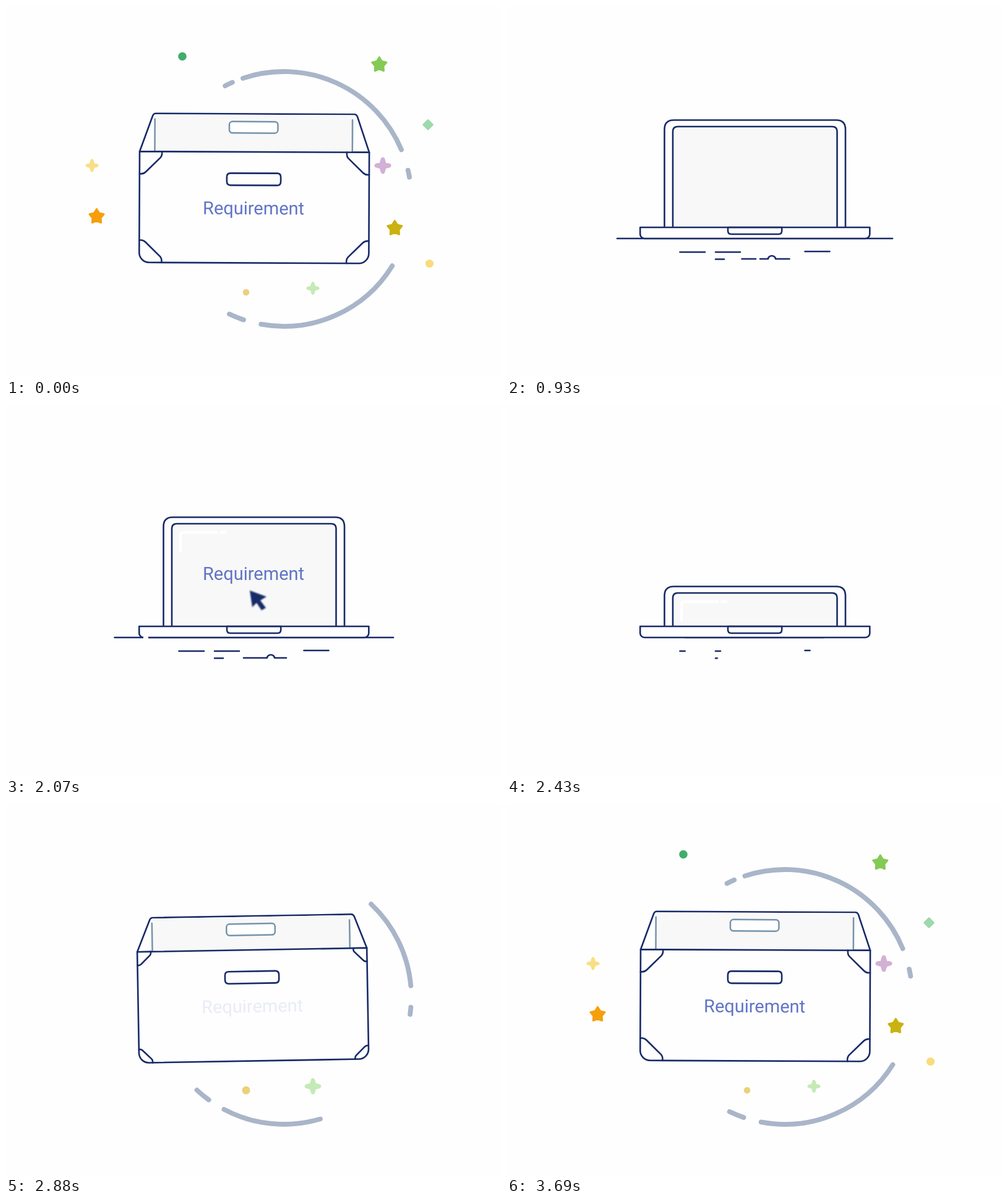
Animation of 800 by 600 pixels, one loop 3.72 s. Source, as an HTML page:

```html
<!DOCTYPE html>
<html lang="en">
<head>
<meta charset="utf-8">
<title>Requirement box</title>
<style>
  html, body { margin: 0; width: 100%; height: 100%; overflow: hidden; background: #fefefe; }
  svg { display: block; width: 800px; height: 600px; }
  .ink { fill: none; stroke: #182a68; stroke-width: 2.6; stroke-linecap: round; stroke-linejoin: round; }
  .white { fill: #fefefe; }
  .steel { fill: none; stroke: #7594ab; stroke-width: 2.5; stroke-linecap: round; }
  .ring { fill: none; stroke: #a9b5c8; stroke-width: 7.8; stroke-linecap: round; }
  .shine { fill: none; stroke: #fff; stroke-width: 4.5; stroke-linecap: round; }
  .grey { fill: #f8f8f8; }
  text { font: 29px Roboto, sans-serif; fill: #6074c5; }
</style>
</head>
<body>
<svg viewBox="0 0 800 600">
  <defs>
    <clipPath id="screen"><rect x="268" y="170" width="265" height="187"/></clipPath>
    <filter id="blur" x="-30%" y="-30%" width="160%" height="160%"><feGaussianBlur stdDeviation="1.3 .8"/></filter>
  </defs>

  <path id="ground" class="ink"/>
  <path id="dashes" class="ink"/>

  <g id="lid">
    <path id="shell" class="ink white"/>
    <path id="panel" class="ink" style="fill:#f8f8f8"/>
    <g clip-path="url(#screen)">
      <g id="content">
        <path id="shine" class="shine" pathLength="1" d="M282 236V211Q282 206 287 206H340"/>
        <path id="glint" class="shine" d="M347 206h7"/>
        <text id="typed" x="318" y="282.5"></text>
        <path id="cursor" fill="#182a68" filter="url(#blur)" d="M0 0L27 10 17 16 26 28 19 32 11 20 4 27Z"/>
      </g>
    </g>
  </g>

  <path id="drop" class="ink white"/>
  <path id="ringLow" class="ring"/>
  <path id="ringTop" class="ring"/>
  <g id="box">
    <g id="back">
      <path id="backEdge" class="ink white"/>
      <path id="backFill" class="grey"/>
      <path id="backLines" class="steel"/>
      <rect id="backGrip" class="steel" style="fill:#fff" x="360" width="78.5" height="18.5" rx="5"/>
    </g>
    <path id="front" class="ink white"/>
    <path id="corners" class="ink"/>
    <path id="grip" class="ink"/>
    <text id="label" x="317.7" y="337">Requirement</text>
  </g>
  <rect id="gap" class="white" y="374" width="8" height="4"/>
  <g id="confetti"></g>
</svg>
<script>
const LOOP = 3720, WORD = 'Requirement';
const el = {};
document.querySelectorAll('[id]').forEach(n => el[n.id] = n);

const set = (id, attrs) => { for (const k in attrs) el[id].setAttribute(k, attrs[k]); };
const show = (id, amount) => set(id, { opacity: +amount });
const mix = (a, b, p) => a + (b - a) * p;
const smooth = x => x * x * (3 - 2 * x);

// Eased value through [time, value] keys
function track(t, ...keys) {
  if (t <= keys[0][0]) return keys[0][1];
  for (let i = 1; i < keys.length; i++) {
    const [t0, a] = keys[i - 1], [t1, b] = keys[i];
    if (t < t1) return mix(a, b, smooth((t - t0) / (t1 - t0)));
  }
  return keys[keys.length - 1][1];
}
const ramp = (t, a, b) => track(t, [a, 0], [b, 1]);

// Confetti: shape, x, y, size, colour, start time
const bits = [
  ['star', 603.3, 95, 12, '#84ca54', 2910],
  ['star', 628.3, 359.5, 12, '#cab210', 2880],
  ['star', 146.5, 340.5, 12, '#f69f0b', 3035],
  ['dot', 285, 81.5, 6.8, '#42ac6d', 3150],
  ['dot', 684.5, 416.5, 6.6, '#f8dc7c', 2880],
  ['dot', 388, 463, 5.3, '#ecd17a', 2690],
  ['diamond', 682, 192, 7.5, '#9dd9ac', 3210],
  ['cross', 139, 258, 10.5, '#f8df86', 3180],
  ['cross', 609, 258, 13.5, '#d3b0d6', 3120],
  ['cross', 496, 456.5, 10.5, '#c5eab6', 2700]
];
const shapes = {
  star(r) {
    const pts = [...Array(10).keys()].map(i => {
      const a = i * Math.PI / 5 - Math.PI / 2, d = i % 2 ? r * .57 : r;
      return (d * Math.cos(a)).toFixed(2) + ' ' + (d * Math.sin(a)).toFixed(2);
    });
    return ['M' + pts.join('L') + 'Z', 3.2];
  },
  dot: r => [`M${-r / 2} 0a${r / 2} ${r / 2} 0 1 0 ${r} 0a${r / 2} ${r / 2} 0 1 0 ${-r} 0Z`, r],
  diamond: r => [`M0 ${-r}L${r} 0 0 ${r} ${-r} 0Z`, 2.5],
  cross(r) {
    const a = r * .75, b = r * .17;
    return [`M0 ${-a}L${b} ${-b} ${a} 0 ${b} ${b} 0 ${a} ${-b} ${b} ${-a} 0 ${-b} ${-b}Z`, r * .5];
  }
};
const nodes = bits.map(([kind, , , size, colour]) => {
  const n = document.createElementNS('http://www.w3.org/2000/svg', 'path');
  const [d, width] = shapes[kind](size);
  for (const [k, v] of Object.entries({ d, fill: colour, stroke: colour, 'stroke-width': width, 'stroke-linejoin': 'round' }))
    n.setAttribute(k, v);
  return el.confetti.appendChild(n);
});

function drawConfetti(t) {
  nodes.forEach((n, i) => {
    const [, x, y, , , start] = bits[i];
    const k = t < 600 ? 1 : track(t - start, [0, 0], [150, 1.3], [300, .95], [400, 1]);
    n.setAttribute('transform', `translate(${x} ${y}) scale(${k})`);
  });
}

// Ring pieces run counter-clockwise and are cut off at the head angle
function ringPath(spans, head, turn) {
  const at = deg => {
    const a = (deg + turn) * Math.PI / 180;
    return `${(449 + 206 * Math.cos(a)).toFixed(2)} ${(312 + 206 * Math.sin(a)).toFixed(2)}`;
  };
  return spans.filter(s => head < s[0])
    .map(([a, b]) => `M${at(a)}A206 206 0 0 0 ${at(Math.max(b, head))}`).join('');
}
const lowSpans = [[115.3, 108.4], [100.3, 31.7]];
const topSpans = [[-9.8, -13], [-22.7, -108.7], [-113.8, -117.4]];

function drawRing(t) {
  const first = t < 600, left = first ? -t : LOOP - t;
  const turn = .0141 * left + 8.3e-6 * left * left;
  set('ringLow', { d: ringPath(lowSpans, first ? 31 : track(t, [2650, 115.3], [2670, 114.3], [3000, 31]), turn) });
  set('ringTop', { d: ringPath(topSpans, first ? -118 : track(t, [2720, -9.8], [3040, -118]), turn) });
}

function drawGround(t) {
  const grow = ramp(t, 300, 480) * (1 - ramp(t, 2300, 2560));
  const l = track(t, [570, 176.5], [930, 178], [1300, 169], [1600, 175.5], [2190, 175.5], [2280, 172]);
  const r = track(t, [570, 625], [930, 623], [1300, 628], [1600, 626]);
  set('ground', { d: grow > 0 ? `M${mix(401, l, grow)} 376H${mix(401, r, grow)}` : '' });

  // Small marks below, drawn one after another and pulled back at the end
  const out = 1 - ramp(t, 2260, 2500);
  const dash = (x, y, w, a, b) => {
    const k = ramp(t, a, b) * out;
    return k > 0 ? `M${x} ${y}h${w * k}` : '';
  };
  let d = dash(279.5, 398, 40.5, 400, 520) + dash(337, 398, 40, 480, 640) + dash(337, 409.5, 14, 490, 560)
    + dash(481.5, 397, 40, 700, 860);
  const k = ramp(t, 640, 880) * out;
  if (k > 0) {
    const a = track(t, [930, 379.5], [1110, 384]), b = mix(a, track(t, [930, 456.5], [1110, 453]), k);
    const hole = track(t, [930, 3.5], [1080, 0]);
    d += hole ? `M${a} 409H${Math.min(b, 405.5 - hole)}` + (b > 405.5 + hole ? `M${405.5 + hole} 409` : '') : `M${a} 409`;
    if (b > 434) d += `H422a6 5 0 0 1 12 0H${b}`;
    else if (b > 409) d += `H${Math.min(b, 422)}`;
  }
  set('dashes', { d });
}

function drawLid(t) {
  const h = track(t, [540, 0], [570, 3.5], [780, 186], [930, 173.5], [1080, 176.5], [2190, 176.5], [2270, 180.5], [2540, 0]);
  const l = track(t, [570, 220], [780, 254.5]), r = 801.5 - l;
  show('lid', h > .3);
  if (h <= .3) return;
  const arch = (a, b, height, rad) => {
    const q = Math.min(rad, height);
    return `M${a} 358v${q - height}q0 ${-q} ${rad} ${-q}H${b - rad}q${rad} 0 ${rad} ${q}V358`;
  };
  set('shell', { d: arch(l, r, h, 15) });
  set('panel', { d: arch(l + 13.5, r - 13.5, Math.max(0, h - 10.5 * Math.min(1, h / 60)), 8) });

  // Screen content rides on the lid and sinks behind the base
  set('content', { transform: `translate(0 ${176.5 - h})` });
  const k = ramp(t, 1110, 1380);
  set('shine', { 'stroke-dasharray': `${k} 2`, opacity: k > 0 ? 1 : 0 });
  show('glint', t > 1380);
  el.typed.textContent = WORD.slice(0, Math.max(0, Math.floor((t - 1170) / 38)));
  const x = track(t, [1740, 500], [2070, 394], [2160, 390]), y = track(t, [1740, 375], [2070, 300], [2160, 295]);
  set('cursor', { transform: `translate(${x} ${y})`, opacity: t > 1740 ? 1 : 0 });
}

function drawDrop(t) {
  const y = track(t, [2530, 376], [2670, 476], [2710, 480], [2800, 412]);
  const on = t > 2530 && t < 2800;
  set('drop', { d: on ? `M254.5 376L256 ${y}H545L546.5 376` : '' });
}

function drawBox(t) {
  const first = t < 330, m = first ? 1 : ramp(t, 2690, 2880);
  const l = 215.2, r = 586.3;
  const top = mix(track(t, [390, 376], [520, 356.5], [570, 357], [640, 358]), 236, m);
  const bottom = mix(376, 415.5, m);
  const rad = Math.min(mix(7, 16, m), bottom - top);
  set('front', {
    d: `M${l} ${top}H${r}V${bottom - rad}a${rad} ${rad} 0 0 1 ${-rad} ${rad}H${l + rad}a${rad} ${rad} 0 0 1 ${-rad} ${-rad}Z`
  });

  const gl = mix(357, 356.3, m), gr = gl + 87.2;
  const gt = mix(top, 270.5, m), gb = mix(Math.min(top + 11, 376), 290, m);
  const q = Math.min(6, (gb - gt) / 2), c = q * m;
  set('grip', {
    d: `M${gl} ${gt + c}V${gb - q}q0 ${q} ${q} ${q}H${gr - q}q${q} 0 ${q} ${-q}V${gt + c}q0 ${-c} ${-c} ${-c}H${gl + c}q${-c} 0 ${-c} ${c}`
  });

  const grown = first ? 1 : ramp(t, 2840, 2980), k = mix(.5, 1, grown);
  const corner = (x, y, sx, sy) => {
    const p = (u, v) => `${x + u * sx * k} ${y + v * sy * k}`;
    return `M${p(36, 0)}Q${p(37, 6)} ${p(34, 9.5)}L${p(10, 33)}Q${p(6, 37)} ${p(0, 36)}`;
  };
  set('corners', {
    d: grown > 0 ? corner(l, top, 1, 1) + corner(r, top, -1, 1) + corner(l, bottom, 1, -1) + corner(r, bottom, -1, -1) : ''
  });
  show('label', first ? 1 : ramp(t, 2850, 2990));

  const h = first ? 61.5 : track(t, [2790, 0], [2920, 70], [3010, 59], [3080, 61.5]);
  show('back', h > 10);
  if (h > 10) {
    const y = top - h;
    set('backEdge', { d: `M${l} ${top}L236 ${y + 4}q1.5 -4 5 -4H562q3.5 0 5 4L${r} ${top}Z` });
    set('backFill', { d: `M240 ${y + 1.3}H562L566 ${y + 6}L559 ${top}H240Z` });
    set('backLines', { d: `M239.7 ${Math.min(top, y + 9)}V${top}M559 ${Math.min(top, y + 9)}V${top}` });
    set('backGrip', { y: y + 12.5, height: Math.max(0, Math.min(18.5, h - 14)) });
  }

  const tilt = first ? .25 : track(t, [2760, 0], [2880, -1], [2990, .7], [3090, -.25], [3220, .4], [3360, .2], [3500, .25]);
  set('box', { transform: t > 330 && t < 2700 ? '' : `rotate(${tilt} 401 416)` });
}

function drawGap(t) {
  const x = track(t, [1500, 640], [1650, 588]) + track(t, [1650, 0], [2070, -366], [2170, -412]);
  show('gap', t > 1510 && t < 2170);
  set('gap', { x });
}

function draw(t) {
  drawGround(t);
  drawLid(t);
  drawDrop(t);
  drawRing(t);
  drawBox(t);
  drawGap(t);
  drawConfetti(t);
  const fade = 1 - ramp(t, 240, 330);
  for (const id of ['ringLow', 'ringTop', 'confetti']) show(id, t > 2600 ? 1 : fade);
  show('box', t > 390 ? 1 : fade);
}

const began = performance.now();
function frame() {
  draw((performance.now() - began) % LOOP);
  requestAnimationFrame(frame);
}
frame();
</script>
</body>
</html>
```
